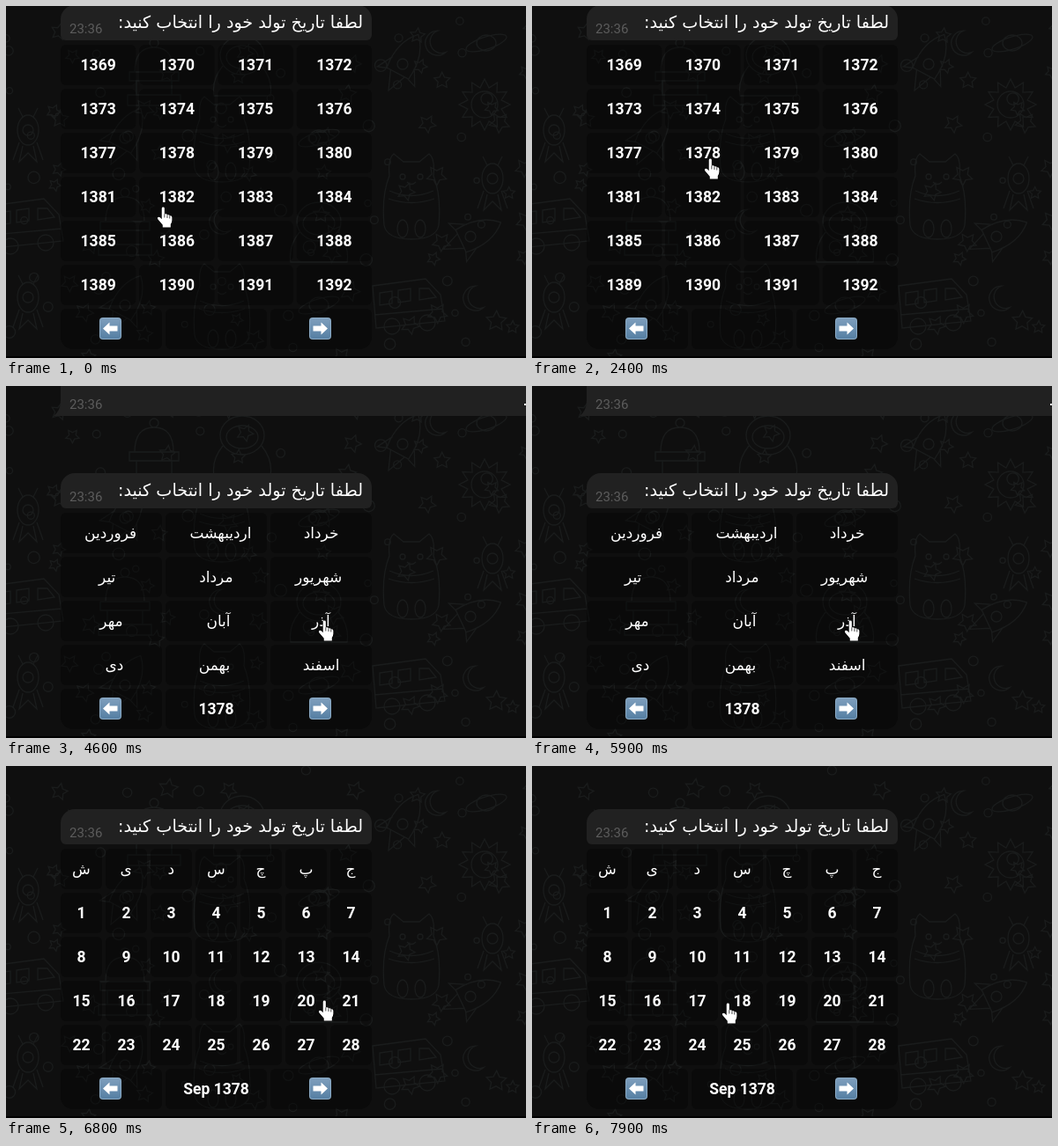
Animation, 590 px wide and 400 px high, one loop 8 s. Source, as an HTML page with a canvas:

```html
<!DOCTYPE html>
<html lang="fa">
<head>
<meta charset="utf-8">
<style>
html, body { margin: 0; width: 100%; height: 100%; overflow: hidden; background: #0f0f0f; }
canvas { display: block; }
</style>
</head>
<body>
<canvas id="stage" width="590" height="400"></canvas>
<script>
const ctx = document.getElementById('stage').getContext('2d');
const LOOP = 8000, LEFT = 62, WIDTH = 353, GAP = 4, ROW = 50;
const LATIN = '600 17.5px Roboto, sans-serif';
const CLOCK = '15px Roboto, sans-serif';
const PERSIAN = '"DejaVu Sans", sans-serif';

const times = (n, f) => Array.from({ length: n }, (_, i) => f(i));
const numbers = (from, rows, cols) =>
  times(rows, r => times(cols, c => String(from + r * cols + c)));
const footer = title => ['<', title, '>'];

const views = {
  years: { top: -1, rows: [...numbers(1369, 6, 4), footer('')] },
  months: {
    top: 99,
    rows: [
      ['فروردین', 'اردیبهشت', 'خرداد'],
      ['تیر', 'مرداد', 'شهریور'],
      ['مهر', 'آبان', 'آذر'],
      ['دی', 'بهمن', 'اسفند'],
      footer('1378')
    ]
  },
  days: { top: 49, rows: [[...'شیدسچپج'], ...numbers(1, 4, 7), footer('Sep 1378')] }
};

const pointerStart = { x: 171, y: 228 };
const moves = [
  { from: 800, to: 1500, x: 195, y: 173 },
  { from: 2900, to: 3500, x: 345, y: 252 },
  { from: 3700, to: 4200, x: 354, y: 266 },
  { from: 7300, to: 7900, x: 215, y: 269 }
];

const hand = new Path2D('M5.5 2Q5.5.6 7 .6T8.5 2V8Q11.3 7.4 11.5 9Q14 8.5 14.2 10' +
  'Q16.6 9.5 16.7 11.6V15Q16.7 17 15.2 19.2V22.5H6.5V20L1.2 13.8Q.2 11.6 2.2 11.3Q3.5 11.3 5.5 13.6Z');
const arrow = new Path2D('M-8.5 0L-1-7V-3H8V3H-1V7Z');

// Wallpaper: a few doodles, then a seeded scatter of stars and rings
const wallpaper = new Path2D();
let seed = 7;
const random = () => (seed = seed * 16807 % 2147483647) / 2147483647;

function add(shape, x, y, angle = 0) {
  wallpaper.addPath(shape, new DOMMatrix().translate(x, y).rotate(angle));
}
const line = (d, ...place) => add(new Path2D(d), ...place);

function ring(x, y, rx, ry = rx, angle = 0) {
  const p = new Path2D();
  p.ellipse(0, 0, rx, ry, 0, 0, 7);
  add(p, x, y, angle);
}

function star(x, y, r, tips = 5, inner = .5, angle = 0) {
  const p = new Path2D();
  times(tips * 2, i => {
    const a = i * Math.PI / tips, k = i % 2 ? r * inner : r;
    p.lineTo(k * Math.sin(a), -k * Math.cos(a));
  });
  p.closePath();
  add(p, x, y, angle);
}

const moon = (x, y) => line('M-5-13A14 14 0 1 0 12 7A13 13 0 0 1-5-13Z', x, y, 20);

function sun(x, y) {
  ring(x, y, 15);
  star(x, y, 29, 12, .68);
}

function planet(x, y) {
  ring(x, y, 11, 9);
  ring(x, y, 24, 7, -18);
}

function rocket(x, y, angle = 28) {
  line('M0-38Q18-20 14 12H-14Q-18-20 0-38ZM-14-2L-24 16L-13 12M14-2L24 16L13 12M-9 12L0 34L9 12', x, y, angle);
  ring(x, y, 6);
}

function robot(x, y) {
  line('M-22 0Q-22-28 0-28T22 0ZM-28 0H28V10H-28ZM-20 10V26H20V10M-30 26H30V38H-30Z', x, y);
  ring(x, y - 33, 5);
}

function astronaut(x, y) {
  ring(x, y, 25, 22);
  ring(x, y + 2, 18, 13);
  line('M-22 12Q-35 28-32 46H32Q35 28 22 12', x, y);
}

function cat(x, y) {
  line('M-25-22Q-27-42-20-47L-9-38H9L20-47Q27-42 25-22Q34 0 31 34Q28 50 0 50T-31 34Q-34 0-25-22Z' +
    'M-25-5Q0 6 25-5M-26 4Q0 13 26 4M-5-15Q0-10 5-15', x, y);
  for (const side of [-10, 10]) {
    ring(x + side, y - 21, 3);
    ring(x + side, y + 38, 6, 10);
  }
}

function alien(x, y) {
  ring(x, y - 9, 12, 17);
  ring(x, y - 9, 6);
  line('M-6-24L-11-34M6-24L11-34M-10 5L-17 25M10 5L17 25M-6 9L-10 27L0 17L10 27L6 9', x, y);
}

function truck(x, y) {
  line('M-42-18L18-26L35-8L40 22L-38 30ZM-40 15L38 8M11-15L22-15L30-5L11-2Z', x, y);
  times(2, i => {
    line('M0 0L14-2V12L0 14Z', x - 34 + i * 21, y - 10 - i * 3);
    ring(x - 20 + i * 40, y + 28 - i * 4, 9);
  });
}

rocket(450, 66);
rocket(527, 262, 65);
moon(490, 42);
moon(533, 332);
planet(545, 42);
sun(543, 112);
cat(460, 215);
alien(552, 205);
truck(458, 336);
robot(168, 75);
astronaut(268, 56);

const doodles = [alien, rocket, cat, planet, truck, robot, moon, astronaut];
times(12, i => doodles[i % doodles.length](25 + i % 4 * 110, 150 + Math.floor(i / 4) * 95));

times(120, i => {
  const x = (i % 12 + random()) * 50, y = (Math.floor(i / 12) + random()) * 40;
  if (i % 2) star(x, y, 7 + random() * 5, 5, .5, random() * 40);
  else ring(x, y, 3 + random() * 4);
});

function box(x, y, w, h, radii, fill) {
  ctx.beginPath();
  ctx.roundRect(x, y, w, h, radii);
  ctx.fillStyle = fill;
  ctx.fill();
}

function text(str, x, y, font, color = '#fff', align = 'center') {
  ctx.font = font;
  ctx.fillStyle = color;
  ctx.textAlign = align;
  ctx.fillText(str, x, y);
}

const clock = y => text('23:36', 72, y, CLOCK, '#5c5c5c', 'left');

function arrowIcon(x, y, flip) {
  const blue = ctx.createLinearGradient(0, y - 12, 0, y + 12);
  blue.addColorStop(0, '#7f9fbd');
  blue.addColorStop(1, '#557fa3');
  box(x - 12.5, y - 12.5, 25, 25, 4, '#8cabc5');
  box(x - 11.5, y - 11.5, 23, 23, 3, blue);
  ctx.save();
  ctx.translate(x, y);
  ctx.scale(flip, 1);
  ctx.fillStyle = '#fff';
  ctx.fill(arrow);
  ctx.restore();
}

function label(str, x, y) {
  if (str === '<' || str === '>') return arrowIcon(x - 1, y - .5, str === '<' ? 1 : -1);
  if (/^[\w ]*$/.test(str)) return text(str, x, y + 6, LATIN);
  // Persian labels are centred on their ink and lose their lowest pixels to the line box
  ctx.save();
  ctx.beginPath();
  ctx.rect(x - 60, y - 23, 120, 33.5);
  ctx.clip();
  ctx.font = '17px ' + PERSIAN;
  ctx.textAlign = 'center';
  const ink = ctx.measureText(str);
  const nudge = (ink.actualBoundingBoxLeft - ink.actualBoundingBoxRight) / 2;
  text(str, x + nudge, y + 6, ctx.font);
  ctx.restore();
}

function message({ top, rows }, shift) {
  const y = top + shift;
  box(LEFT, y, WIDTH, 40, [16, 16, 6, 6], '#212121');
  clock(y + 32);
  ctx.direction = 'rtl';
  text('لطفا تاریخ تولد خود را انتخاب کنید:', 405, y + 26, '19.2px ' + PERSIAN, '#fff', 'right');
  ctx.direction = 'ltr';
  rows.forEach((row, r) => {
    const w = (WIDTH - GAP * (row.length - 1)) / row.length;
    const rowY = y + 45 + r * ROW, last = r === rows.length - 1;
    row.forEach((str, c) => {
      const x = LEFT + c * (w + GAP);
      const corners = [6, 6, last && c === row.length - 1 ? 14 : 6, last && !c ? 14 : 6];
      box(x, rowY, w, ROW - GAP, corners, 'rgba(0,0,0,.36)');
      label(str, x + w / 2, rowY + 23);
    });
  });
}

function previousMessage(bottom) {
  ctx.fillStyle = '#212121';
  ctx.fill(new Path2D(`M62 ${bottom - 60}H590V${bottom}H54Q62 ${bottom - 6} 62 ${bottom - 18}Z`));
  clock(bottom - 8);
  ctx.fillStyle = '#fff';
  ctx.fillRect(588, bottom - 14, 2, 2);
}

function pointer(t) {
  let { x, y } = pointerStart;
  for (const move of moves) {
    const p = Math.min(1, Math.max(0, (t - move.from) / (move.to - move.from)));
    const eased = p * p * (3 - 2 * p);
    x += (move.x - x) * eased;
    y += (move.y - y) * eased;
  }
  ctx.save();
  ctx.translate(Math.round(x), Math.round(y));
  ctx.scale(1.04, 1.04);
  ctx.strokeStyle = '#000';
  ctx.fillStyle = '#fff';
  ctx.lineWidth = 1;
  ctx.stroke(hand);
  ctx.fill(hand);
  ctx.lineWidth = .7;
  ctx.stroke(new Path2D('M8.5 8V12M11.5 9V12.5M14.2 10V13'));
  ctx.restore();
}

function draw(now) {
  const t = Math.floor(now % LOOP / 100) * 100; // ten steps per second
  const view = t < 2900 ? views.years : t < 6500 ? views.months : views.days;
  const rest = Math.max(0, 1 - (t - 6500) / 290);
  const shift = view === views.days ? Math.round(ROW * rest ** 3) : 0;

  ctx.fillStyle = '#0f0f0f';
  ctx.fillRect(0, 0, 590, 400);
  ctx.strokeStyle = '#1a1c1c';
  ctx.lineWidth = 1.3;
  ctx.stroke(wallpaper);

  if (view !== views.years) previousMessage(view.top + shift - 65);
  message(view, shift);
  ctx.fillStyle = '#000';
  ctx.fillRect(0, 398, 590, 2);
  pointer(t);
}

let origin;
function tick(now) {
  origin ??= now;
  draw(now - origin);
  requestAnimationFrame(tick);
}
requestAnimationFrame(tick);
</script>
</body>
</html>
```
